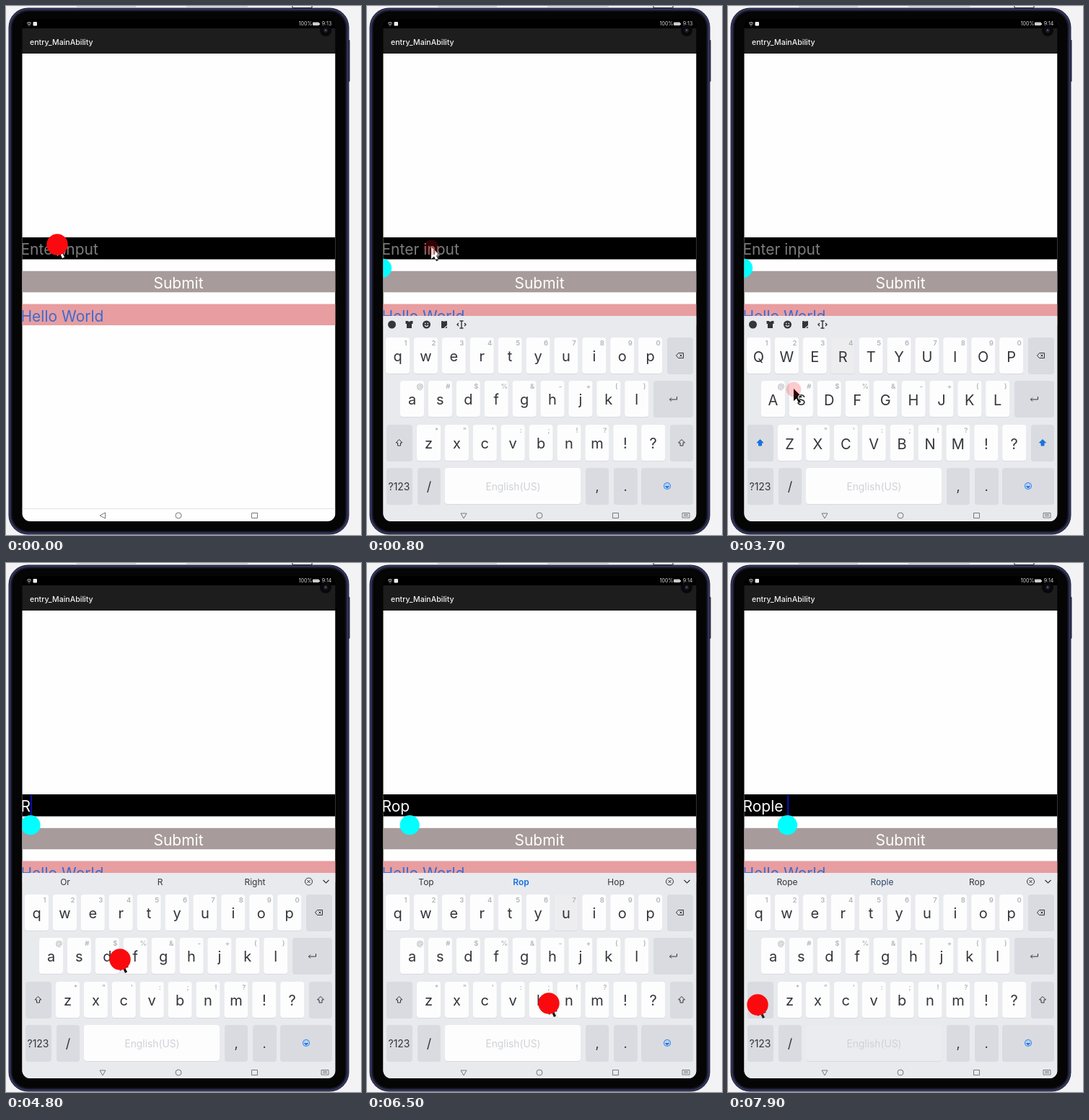
An HTML page with a canvas that plays this animation: 492 px wide and 734 px high, repeating every 8 s.

```html
<!DOCTYPE html>
<html lang="en">
<head>
<meta charset="utf-8">
<title>Tablet text input</title>
<style>
html, body { margin: 0; width: 492px; height: 734px; overflow: hidden; background: #f3f3f5; }
canvas { display: block; }
</style>
</head>
<body>
<canvas id="stage" width="492" height="734"></canvas>
<script>
const ctx = document.getElementById('stage').getContext('2d');
const LOOP = 8000, STEP = 100, PITCH = 38.9;
const INK = '#33353a', BLUE = '#1673e0', KEY = '#fdfdfe', GREY_KEY = '#d9dbe0', BOARD = '#e9eaee';

// time, x, y of the pointer
const path = [
  [0, 71, 331], [300, 75, 333], [800, 89, 335], [1800, 90, 340], [2200, 32, 606], [2500, 36, 612],
  [2700, 57, 590], [3200, 158, 492], [3400, 155, 495], [3700, 91, 532], [4000, 62, 545],
  [4400, 70, 546], [4800, 158, 550], [5200, 256, 548], [5500, 258, 545], [5800, 276, 490],
  [6200, 374, 548], [6500, 252, 611], [6850, 200, 655], [7200, 20, 622], [7900, 41, 613], [8000, 41, 613]
];
const clicks = [850, 2400, 3200, 3750, 5250, 5800, 6150, 6850];

// time, typed text, suggestions
const typing = [
  [3800, 'R', ['Or', 'R', 'Right']],
  [4900, 'Ro', ['So', 'Ro', 'Robot']],
  [6000, 'Rop', ['Top', 'Rop', 'Hop']],
  [6600, 'Ropl', ['Roll', 'Ropl', 'Rope']],
  [7200, 'Rople', ['Ripe', 'Rople', 'Rope']],
  [7700, 'Rople ', ['Rope', 'Rople', 'Rop']]
];

// key, from, to
const presses = [['r', 3500, 3800], ['a', 4500, 4700], ['h', 5800, 6000], ['u', 6400, 6600],
  ['l', 7000, 7200], ['space', 7600, 8000]];

const rows = [
  [26, 460, 'qwertyuiop', '1234567890'],
  [46, 520, 'asdfghjkl', '@#$%&-+()'],
  [69, 581, 'zxcvbnm!?', '*"\':;!?']
];

function rect(x, y, w, h, fill, r = 0) {
  ctx.beginPath();
  ctx.roundRect(x, y, w, h, r);
  ctx.fillStyle = fill;
  ctx.fill();
}

function disc(x, y, r, fill) {
  ctx.beginPath();
  ctx.arc(x, y, r, 0, 7);
  ctx.fillStyle = fill;
  ctx.fill();
}

function setFont(size, weight = 400) {
  ctx.font = `${weight} ${size}px Inter, Roboto, sans-serif`;
}

function text(s, x, y, size, fill, align = 'center', weight = 400) {
  setFont(size, weight);
  ctx.textAlign = align;
  ctx.fillStyle = fill;
  ctx.fillText(s, x, y);
}

function shape(d, x, y, stroke, fill, width = 1) {
  const p = new Path2D(d);
  ctx.save();
  ctx.translate(x, y);
  if (fill) { ctx.fillStyle = fill; ctx.fill(p); }
  if (stroke) { ctx.strokeStyle = stroke; ctx.lineWidth = width; ctx.stroke(p); }
  ctx.restore();
}

function pointerAt(t) {
  const i = path.findIndex(p => p[0] > t);
  const [t0, x0, y0] = path[i - 1], [t1, x1, y1] = path[i];
  let k = (t - t0) / (t1 - t0);
  k = k * k * (3 - 2 * k);
  return [x0 + (x1 - x0) * k, y0 + (y1 - y0) * k];
}

function drawDevice() {
  rect(0, 0, 492, 734, '#f3f3f5');
  rect(98, 0, 82, 1.5, '#d0d0d3');
  rect(250, 0, 85, 1.5, '#d0d0d3');
  shape('M0 0V2.5H27V0', 397, 0, '#222');
  rect(474, 47, 2.5, 58, '#25263a', 1);
  rect(3.5, 2.5, 472, 731, '#23243a', 27);
  rect(4.5, 3.5, 470, 729, '#34375e', 26);
  rect(6.5, 5.5, 466, 725, '#191a28', 24);
  rect(8.5, 7.5, 462, 721, '#050506', 22);
}

function drawStatus(t) {
  rect(22, 18, 434.5, 13, '#000');
  rect(22, 31, 434.5, 35, '#1d1d1d');
  shape('M-3 -1Q0 -4 3 -1M-2 1Q0 -1 2 1M0 2V3', 32, 25, '#ddd');
  rect(37.5, 22, 5.5, 5.5, '#eee', 1);
  text('100%', 415, 27, 7, '#ddd');
  rect(425, 22.5, 9, 4.5, '#ccc', 1);
  rect(434, 24, 1, 2, '#ccc');
  text(t < 1400 ? '9:13' : '9:14', 444.5, 27, 7, '#ddd');
  disc(443, 34, 8, '#08080a');
  disc(443, 34, 3, '#1c1f2b');
  disc(443, 33.5, 1, '#6a6d7a');
  text('entry_MainAbility', 33, 53.5, 10.6, '#f2f2f2', 'left', 500);
}

function drawContent(t, open, state) {
  rect(22, 66, 434.5, 649, '#fefefe');
  rect(22, 321, 434.5, 30.5, '#000');
  rect(22, 367.7, 434.5, 29.6, '#a89b9b');
  rect(22, 413.6, 434.5, 29.4, '#e89da0');
  const typed = state ? state[1] : '';
  text(typed || 'Enter input', 20.5, 345, 21, typed ? '#fff' : '#7c7c7c', 'left');
  text('Submit', 239, 391.5, 21, '#fff');
  text('Hello World', 20.5, 437.5, 21, '#3a6bd0', 'left');
  if (!open) return;
  setFont(21);
  ctx.textAlign = 'left';
  const caret = 20.5 + ctx.measureText(typed).width;
  if (state && (t - state[0]) % 1000 < 500) rect(caret, 322, 1.6, 28, '#1010d8');
  disc(caret, 363.7, 13.6, '#00ffff');
}

function drawNav(open) {
  const c = '#77797d';
  if (!open) rect(22, 697, 434.5, 1, '#e3e3e3');
  shape(open ? 'M-4 -3H4L0 4Z' : 'M3.5 -4V4L-4 0Z', 134, 707, c);
  ctx.beginPath();
  ctx.arc(239, 707, 4, 0, 7);
  ctx.strokeStyle = c;
  ctx.stroke();
  shape('M-4 -3.5H4V3.5H-4Z', 344.5, 707, c);
  if (open) shape('M-5 -3.5H5V3H-5ZM-3 -1.5H3M-3 .5H3', 442, 707, c);
}

function drawToolbar() {
  disc(34.5, 442, 5.5, INK);
  shape('M-5 -5H-2Q0 -3 2 -5H5V-1H3.5V5H-3.5V-1H-5Z', 58.5, 442, null, INK);
  disc(82.5, 442, 5.5, INK);
  shape('M-2.5 1Q0 4 2.5 1M-2.5 -1.5H-1M1 -1.5H2.5', 82.5, 442, BOARD, null, 1.3);
  rect(103, 437, 8, 10, INK, 1);
  shape('M-2 -5H2M0 5L5 1', 107, 442, BOARD, null, 1.2);
  shape('M-2.5 -5H2.5M0 -5V5M-2.5 5H2.5M-4 -2L-6 0L-4 2M4 -2L6 0L4 2', 131, 442, INK, null, 1.4);
}

function drawSuggestions(state) {
  const typed = state[1];
  const live = typed.length > 1 && !typed.endsWith(' ');
  const middle = live ? BLUE : typed.length > 1 ? '#2f4568' : INK;
  state[2].forEach((word, i) => {
    const main = i === 1;
    text(word, 82 + i * 131.5, 447, 12, main ? middle : INK, 'center', main && live ? 600 : 400);
  });
  ctx.beginPath();
  ctx.arc(419.5, 442, 5, 0, 7);
  ctx.strokeStyle = INK;
  ctx.stroke();
  shape('M-2 -2L2 2M2 -2L-2 2', 419.5, 442, INK);
  shape('M-4 -2L0 2L4 -2', 443.5, 442, INK, null, 1.2);
}

function key(x, y, w, fill) {
  rect(x, y + 1, w, 50, '#d8dae0', 4);
  rect(x, y, w, 50, fill, 4);
}

function drawKeyboard(t, state) {
  const caps = t >= 2600 && t < 3800;
  const pressed = name => presses.some(([k, a, b]) => k === name && t >= a && t < b);
  rect(22, 430, 434.5, 304, BOARD);
  state ? drawSuggestions(state) : drawToolbar();

  for (const [x0, y, letters, hints] of rows) {
    [...letters].forEach((c, i) => {
      const x = x0 + i * PITCH;
      key(x, y, 33, pressed(c) ? '#ededf0' : KEY);
      text(caps ? c.toUpperCase() : c, x + 16.5, y + (caps ? 34 : 33), 20, INK);
      if (hints[i]) text(hints[i], x + 27.5, y + 10.5, 9.5, '#b2b4b9', 'center', 600);
    });
  }

  for (const [x, y, w] of [[416, 460, 36], [397, 520, 55], [27, 581, 36], [420, 581, 32],
    [27, 641, 36], [70, 641, 32], [303, 641, 32], [342, 641, 33], [380, 641, 72]]) {
    key(x, y, w, GREY_KEY);
  }
  key(108, 641, 188, pressed('space') ? '#ebecf0' : KEY);
  text('English(US)', 202.5, 671.5, 13.8, '#cfd1d5');
  text('?123', 44.5, 672, 14, INK);
  text('/', 86, 673, 18, INK);
  text(',', 319, 673, 18, INK);
  text('.', 358, 673, 18, INK);

  shape('M-5 0L-2 -3.5H5V3.5H-2ZM0 -1.5L3 1.5M3 -1.5L0 1.5', 433.5, 485, INK);
  shape('M5 -3V1H-5M-2.5 -1.5L-5 1L-2.5 3.5', 424.5, 545, INK);
  for (const x of [44.5, 436]) {
    shape('M0 -4.5L4.5 0H2V4H-2V0H-4.5Z', x, 606, caps ? BLUE : INK, caps ? BLUE : null);
  }
  disc(416, 666, 5, '#3b86e8');
  disc(416, 666, 3.8, '#d5e2f4');
  shape('M-2.5 .5Q0 4.5 2.5 .5ZM-2 -1.5H-1M1 -1.5H2', 416, 666, BLUE, BLUE);
}

function drawPointer(t) {
  const [x, y] = pointerAt(t);
  ctx.globalCompositeOperation = 'difference';
  shape('M0 0V17L4 13.5L7 20L10 18.5L7 12.5L12 12Z', x, y - 1, null, '#fff');
  ctx.globalCompositeOperation = 'source-over';
  const near = Math.min(1, ...clicks.map(c => Math.abs(t - c) / 200));
  ctx.globalAlpha = 0.15 + 0.85 * near * near;
  disc(x, y, 9 + 5.7 * near, '#fa0a0e');
  ctx.globalAlpha = 1;
}

function draw(now) {
  const t = Math.floor(now % LOOP / STEP) * STEP;
  const state = typing.filter(s => s[0] <= t).pop();
  const rise = Math.min(1, Math.max(0, (t - 300) / 300));
  const open = rise > 0;

  drawDevice();
  ctx.save();
  ctx.beginPath();
  ctx.roundRect(22.5, 18, 434, 697, 11);
  ctx.clip();
  drawStatus(t);
  drawContent(t, open, state);
  if (open) {
    ctx.save();
    ctx.translate(0, 285 * (1 - rise) ** 2);
    drawKeyboard(t, state);
    ctx.restore();
  }
  drawNav(open);
  ctx.restore();
  drawPointer(t);
}

const start = performance.now();
function tick() {
  draw(performance.now() - start);
  requestAnimationFrame(tick);
}
tick();
</script>
</body>
</html>
```
